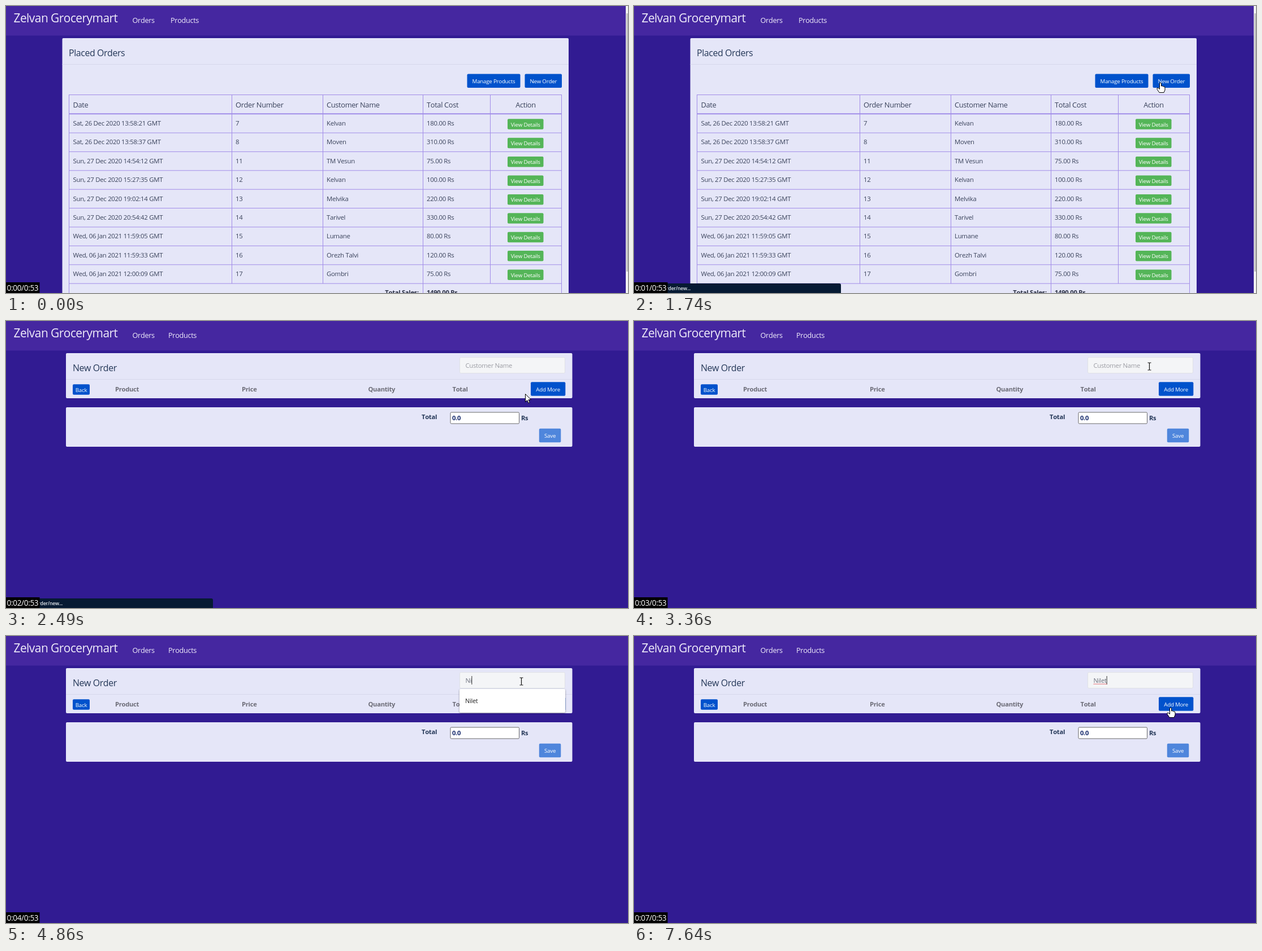
Animation of 1100x509 px, one loop 8 s. Source, as an HTML page:

```html
<!DOCTYPE html>
<html lang="en">
<head>
<meta charset="utf-8">
<title>Order desk</title>
<style>
  html, body { margin: 0; width: 100%; height: 100%; overflow: hidden; background: #311b92; }
  svg { display: block; }
  text { font-family: "Open Sans", "Noto Sans", sans-serif; letter-spacing: -.025em; font-kerning: none; white-space: pre; }
  .cursor { fill: #fff; stroke: #000; stroke-width: 1; stroke-linejoin: round; }
</style>
</head>
<body>
<svg id="stage" width="1100" height="509" viewBox="0 0 1100 509"></svg>
<script>
const LOOP = 8000, INK = '#3a435b', NAVY = '#253858', BLUE = '#0052cc', GREEN = '#54b558',
      CARD = '#e5e6f8', RULE = '#a18ce8';

const rect = (x, y, w, h, fill, extra = '') =>
  `<rect x="${x}" y="${y}" width="${w}" height="${h}" fill="${fill}" ${extra}/>`;
const text = (x, y, size, fill, label, extra = '') =>
  `<text x="${x}" y="${y}" font-size="${size}" fill="${fill}" ${extra}>${label}</text>`;
const bold = (x, y, fill, label, extra = '') =>
  text(x, y, 11.2, fill, label, 'font-weight="700" ' + extra);
const button = (x, y, w, h, fill, label, id = '') =>
  rect(x, y, w, h, fill, `rx="2" ${id}`) +
  text(x + w / 2, y + h / 2 + 4, 9.75, '#fff', label, 'text-anchor="middle" font-weight="500"');
const line = (x1, y1, x2, y2, color, width = 1) =>
  `<path d="M${x1} ${y1}L${x2} ${y2}" stroke="${color}" stroke-width="${width}"/>`;
const group = (id, content) => `<g id="${id}">${content}</g>`;

const nav = productsX => rect(0, 0, 1100, 52.5, '#4527a0') +
  text(13.5, 28.5, 20.9, '#f0edfa', 'Zelvan Grocerymart') +
  text(223.5, 29.5, 12.7, '#f0edfa', 'Orders') +
  text(productsX, 29.5, 12.7, '#f0edfa', 'Products');

function ordersPage() {
  const orders = [
    ['Sat, 26 Dec 2020 13:58:21', 7, 'Kelvan', 180],
    ['Sat, 26 Dec 2020 13:58:37', 8, 'Moven', 310],
    ['Sun, 27 Dec 2020 14:54:12', 11, 'TM Vesun', 75],
    ['Sun, 27 Dec 2020 15:27:35', 12, 'Kelvan', 100],
    ['Sun, 27 Dec 2020 19:02:14', 13, 'Melvika', 220],
    ['Sun, 27 Dec 2020 20:54:42', 14, 'Tarivel', 330],
    ['Wed, 06 Jan 2021 11:59:05', 15, 'Lumane', 80],
    ['Wed, 06 Jan 2021 11:59:33', 16, 'Orezh Talvi', 120],
    ['Wed, 06 Jan 2021 12:00:09', 17, 'Gombri', 75]
  ];
  const columns = [118.5, 406, 567, 744];
  const pitch = 33.4;
  let out = nav(291) + rect(99.5, 57, 895.5, 460, CARD, 'rx="2"') +
    text(111, 88.5, 15.9, NAVY, 'Placed Orders') + line(99.5, 103.5, 995, 103.5, '#d7d8ec') +
    button(815.5, 120.5, 94, 24.5, BLUE, 'Manage Products') +
    button(917.5, 120.5, 65.5, 24.5, BLUE, 'New Order');
  ['Date', 'Order Number', 'Customer Name', 'Total Cost'].forEach((label, i) =>
    out += text(columns[i], 179.5, 12.8, INK, label));
  out += text(919, 179.5, 12.8, INK, 'Action', 'text-anchor="middle"');
  orders.forEach(([date, number, name, cost], i) => {
    const y = i * pitch;
    [date + ' GMT', number, name, cost + '.00 Rs'].forEach((value, c) =>
      out += text(columns[c], 212 + y, 11.4, INK, value));
    out += button(887, 200.3 + y, 63.5, 18.5, GREEN, 'View Details', i ? '' : 'id="firstView"') +
      line(112, 225 + y, 983, 225 + y, RULE);
  });
  out += line(111.5, 157.5, 983, 157.5, RULE) + line(112, 191.3, 983, 191.3, RULE, 2);
  [111.5, 737.5, 982.5].forEach(x => out += line(x, 157, x, 509, RULE));
  [399.5, 560.5, 856.5].forEach(x => out += line(x, 157, x, 492, RULE));
  return out + bold(730, 512, '#2b3144', 'Total Sales:', 'text-anchor="end"') +
    bold(744, 512, '#2b3144', '1490.00 Rs') +
    rect(1096, 0, 4, 509, '#f1f1f1') + rect(1097, 13, 3, 458, '#c1c1c1');
}

function newOrderPage() {
  const gray = '#6b6b76';
  return nav(287) + rect(106, 57, 895.5, 80, CARD, 'rx="2"') + rect(106, 153, 895.5, 70, CARD, 'rx="2"') +
    text(118, 88.5, 15.9, NAVY, 'New Order') + line(106, 103.5, 1001, 103.5, '#d7d8ec') +
    rect(802.5, 64.5, 186, 28, '#f4f5f7', 'rx="2" stroke="#dfe1e6"') +
    button(118, 112.3, 30, 18.5, BLUE, 'Back') + button(928, 108.3, 61.3, 24.5, BLUE, 'Add More') +
    bold(193, 125, gray, 'Product') + bold(417, 125, gray, 'Price') +
    bold(640.5, 125, gray, 'Quantity') + bold(789.5, 125, gray, 'Total') +
    bold(735, 174, NAVY, 'Total') + bold(911, 176, NAVY, 'Rs') +
    rect(786, 162, 121.5, 20, '#fff', 'rx="1.5" stroke="#6b6b6b"') + bold(789, 176, '#172b6d', '0.0') +
    button(942.8, 190.7, 38.5, 24.5, '#4f86dc', 'Save') +
    text(812.5, 83, 11.3, '#9b9ca3', 'Customer Name', 'id="hint"') +
    text(812.5, 83, 11.3, '#6b6f7b', '', 'id="typed"') +
    rect(0, 71, 1, 15, '#333', 'id="caret"') +
    `<path id="squiggle" d="M812.5 86${'l1.5 -1.5l1.5 1.5'.repeat(8)}" fill="none" stroke="#e0404a" stroke-width=".8"/>` +
    group('dropdown', rect(802, 94, 187, 188.5, '#fff',
      'id="panel" rx="2" style="filter:drop-shadow(0 1px 1.5px rgba(0,0,0,.4))"') + group('names', ''));
}

const shapes = {
  arrow: '<path class="cursor" d="M0 0V14L3.2 11L5.4 16L7.6 15L5.5 10.2H10Z"/>',
  hand: '<path class="cursor" d="M-1.5 1Q0 -1 1.5 1V6Q3.5 5 4.5 6.7Q8 6 8 9V13L6 17.5H-2L-6 11.5Q-6.5 8.5 -4 9.3L-1.5 11.5Z"/>',
  beam: '<path d="M-3 -6.5H-1L0 -6L1 -6.5H3M0 -6V6M-3 6.5H-1L0 6L1 6.5H3" fill="none" stroke="#111" stroke-width="1.2"/>'
};

const stage = document.getElementById('stage');
stage.innerHTML = group('orders', ordersPage()) + group('newOrder', newOrderPage()) +
  group('status', '<path d="M0 509V492H363Q366 492 366 495V509Z" fill="#061a33"/>' +
    text(57, 504, 8.6, '#e8ecf2', 'rder/new...', 'font-weight="600"')) +
  rect(0, 490, 59.5, 19, '#000') + text(1.5, 505, 13.6, '#fff', '', 'id="clock"') +
  Object.keys(shapes).map(kind => group(kind, shapes[kind])).join('');

const el = Object.fromEntries([...stage.querySelectorAll('[id]')].map(node => [node.id, node]));
const show = (node, visible) => node.setAttribute('display', visible ? 'inline' : 'none');

// Pointer poses, each held until the next: time, x, y, shape.
const pointer = [
  [220, 960, 355, 'arrow'], [360, 951, 312, 'arrow'], [610, 948, 250, 'arrow'], [730, 946, 206, 'hand'],
  [1000, 946, 182.5, 'arrow'], [1110, 939, 166, 'arrow'], [1240, 922, 150, 'arrow'], [1360, 912, 138, 'arrow'],
  [1500, 926, 137, 'hand'], [1620, 931, 136, 'hand'], [2490, 918.5, 129.5, 'arrow'], [2880, 917, 122, 'arrow'],
  [3000, 915, 108, 'arrow'], [3110, 913, 95, 'arrow'], [3240, 911, 84, 'beam'], [3360, 911.5, 80.5, 'beam'],
  [6860, 925, 100, 'arrow'], [6980, 944, 126, 'hand'], [7120, 949, 127, 'hand']
];
const customer = 'Nilet';
const suggestions = ['Jovarik', 'Kelvan', 'Tallowman', 'Moven', customer, 'ff'];
const keyTimes = [4500, 4860, 5050, 5250, 5510];
const caretToggles = [3500, 4130, 4500, 5980, 6470, 7120, 7640];
const passed = (times, t) => times.filter(time => time <= t).length;

function draw(t) {
  const pose = pointer.filter(p => p[0] <= t).pop();
  for (const kind in shapes) show(el[kind], pose && pose[3] === kind);
  if (pose) el[pose[3]].setAttribute('transform', `translate(${pose[1]} ${pose[2]})`);

  show(el.orders, t < 2490);
  show(el.newOrder, t >= 2490);
  show(el.status, t >= 1500 && t < 3000);
  el.firstView.setAttribute('fill', t >= 730 && t < 1000 ? '#449d48' : GREEN);
  el.clock.textContent = `0:0${Math.min(7, Math.floor((t + 20) / 1000))}/0:53`;

  const letters = passed(keyTimes, t);
  el.typed.textContent = customer.slice(0, letters);
  show(el.hint, !letters);
  show(el.squiggle, t >= 6610);
  show(el.caret, passed(caretToggles, t) % 2);
  if (t >= 2490) el.caret.setAttribute('x', 812.5 + (letters ? el.typed.getComputedTextLength() : 0));

  const listed = letters ? [customer] : suggestions;
  show(el.dropdown, t >= 3500 && t < 5510);
  el.panel.setAttribute('height', 12.5 + listed.length * 29.33);
  el.names.innerHTML = listed.map((name, i) => text(812, 119 + i * 29.33, 10.9, '#222', name)).join('');
}

const start = performance.now();
function tick() {
  draw((performance.now() - start) % LOOP);
  requestAnimationFrame(tick);
}
tick();
</script>
</body>
</html>
```
